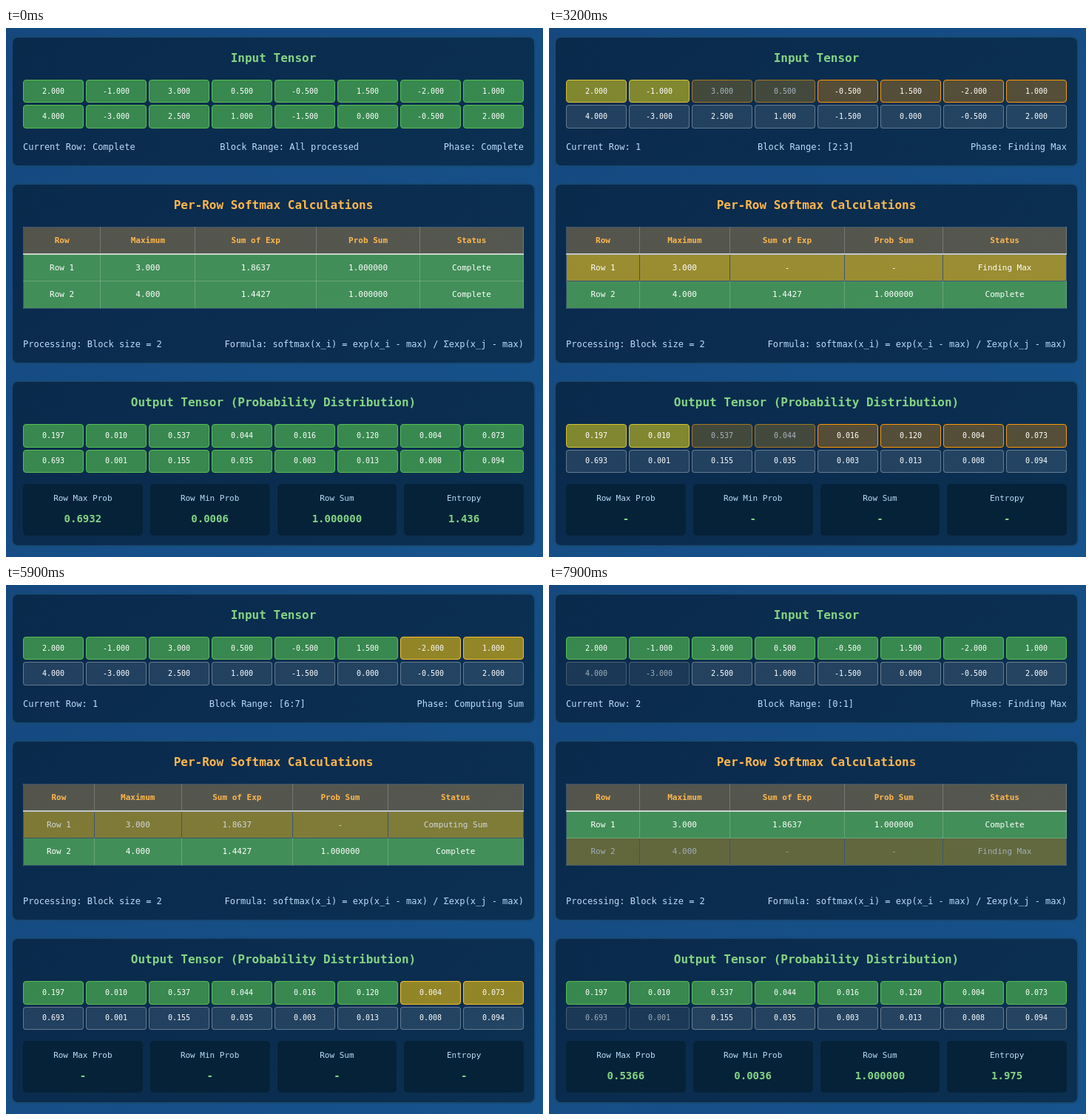
Animation, 726 px wide and 716 px high, one loop 8 s. Source, as an HTML page:

```html
<!DOCTYPE html>
<html lang="en">
<head>
<meta charset="utf-8">
<title>Softmax by blocks</title>
<style>
* { box-sizing: border-box; }
html, body { margin: 0; width: 100%; height: 100%; overflow: hidden; }
body {
  position: relative;
  background: linear-gradient(135deg, #15487f, #17538c);
  font: 12px/14px "DejaVu Sans Mono", monospace;
  color: #fff;
}
.panel {
  position: absolute; left: 7px; width: 709px;
  background: linear-gradient(135deg, #0a2a4c, #0b3052);
  border: 2px solid #174a74; border-radius: 9px;
}
.title, .info, .grid, .stats, table { position: absolute; left: 23px; width: 677px; }
.title { font-size: 16px; line-height: 20px; font-weight: bold; text-align: center; color: #84d484; }
.title.orange, th { color: #ffb74d; }
.info { display: flex; justify-content: space-between; color: #bbdefb; }
.grid { display: grid; grid-template-columns: repeat(8, 82px); grid-auto-rows: 31.4px; gap: 3px; }
.cell {
  display: flex; align-items: center; justify-content: center;
  border: 1px solid; border-radius: 4px; font-size: 10px;
}
table { top: 269px; height: 110px; border-collapse: collapse; font-size: 11px; line-height: 13px; text-align: center; }
th, td { padding: 0 12px; height: 36.5px; border: 1px solid rgba(255, 255, 255, .2); }
th { background: rgba(255, 183, 77, .3); border-bottom: 2px solid rgba(255, 255, 255, .7); }
td { background: rgba(255, 255, 255, .05); }
.stats { top: 617px; display: grid; grid-template-columns: repeat(4, 1fr); gap: 10px; }
.stat { height: 69.5px; padding-top: 13px; border-radius: 5px; background: #062238; text-align: center; font-size: 11px; color: #bbdefb; }
.stat b { display: block; margin-top: 12px; font-size: 14px; line-height: 17px; color: #84d484; }
</style>
</head>
<body>
<div class="panel" style="top:11px;height:177px"></div>
<div class="panel" style="top:210px;height:245px"></div>
<div class="panel" style="top:477px;height:225px"></div>

<div class="title" style="top:31px">Input Tensor</div>
<div class="grid" id="input" style="top:69.9px"></div>
<div class="info" style="top:154px"><span id="row"></span><span id="range"></span><span id="phase"></span></div>

<div class="title orange" style="top:230px">Per-Row Softmax Calculations</div>
<table>
  <thead><tr><th>Row</th><th>Maximum</th><th>Sum of Exp</th><th>Prob Sum</th><th>Status</th></tr></thead>
  <tbody id="rows"></tbody>
</table>
<div class="info" style="top:421px"><span>Processing: Block size = 2</span><span>Formula: softmax(x_i) = exp(x_i - max) / Σexp(x_j - max)</span></div>

<div class="title" style="top:497px">Output Tensor (Probability Distribution)</div>
<div class="grid" id="output" style="top:536.3px"></div>
<div class="stats" id="stats"></div>

<script>
const LOOP = 8000, START = 2750, STEP = 400, FADE = 300, PULSE = 1000;
const BLOCK = 2, BLOCKS = 4;
const PHASES = ['Finding Max', 'Computing Sum', 'Computing Softmax'];
const ROW_DONE = 3;
const INPUT = [
  [2, -1, 3, .5, -.5, 1.5, -2, 1],
  [4, -3, 2.5, 1, -1.5, 0, -.5, 2]
];
const STYLES = {
  idle: ['rgba(255,255,255,.1)', 'rgba(255,255,255,.3)'],
  active: ['rgba(255,152,0,.3)', '#ff9800'],
  current: ['rgba(255,205,10,.57)', '#ffc42a'],
  done: ['rgba(76,175,80,.7)', '#56c04f']
};

const $ = id => document.getElementById(id);
const sum = list => list.reduce((a, b) => a + b, 0);
const expSum = (list, max) => sum(list.map(x => Math.exp(x - max)));

const OUTPUT = INPUT.map(row => {
  const max = Math.max(...row), total = expSum(row, max);
  return row.map(x => Math.exp(x - max) / total);
});

// Everything starts complete, then row 1 runs through its phases and row 2 begins.
const steps = [{ at: 0, row: 2 }];
for (let i = 0; i < PHASES.length * BLOCKS; i++)
  steps.push({ at: START + i * STEP, row: 0, phase: Math.floor(i / BLOCKS), block: i % BLOCKS });
steps.push({ at: 7550, row: 0, phase: ROW_DONE, block: BLOCKS - 1 });
steps.push({ at: 7885, row: 1, phase: 0, block: 0 });

// The CSS "ease" curve.
function ease(x) {
  if (x <= 0 || x >= 1) return x <= 0 ? 0 : 1;
  const bezier = (t, a, b) => 3 * a * t * (1 - t) ** 2 + 3 * b * t * t * (1 - t) + t ** 3;
  let low = 0, high = 1;
  for (let i = 0; i < 20; i++) {
    const mid = (low + high) / 2;
    if (bezier(mid, .25, .25) < x) low = mid; else high = mid;
  }
  return bezier(low, .1, 1);
}

function pulse(age) {
  const x = age % PULSE / PULSE * 2;
  return x < 1 ? .6 + .4 * ease(x) : 1 - .4 * ease(x - 1);
}

function cellState(step, row, col, isInput) {
  if (row < step.row || (row === step.row && step.phase === ROW_DONE)) return 'done';
  if (row > step.row) return 'idle';
  const block = Math.floor(col / BLOCK);
  if (block === step.block) return 'current';
  if (block < step.block) return isInput && step.phase === 2 ? 'current' : 'done';
  return step.phase ? 'done' : 'active';
}

const rowRunning = (step, row) => row === step.row && step.phase < ROW_DONE;

function rowTexts(step, row) {
  const values = INPUT[row], name = 'Row ' + (row + 1);
  const max = Math.max(...values);
  if (!rowRunning(step, row))
    return [name, max.toFixed(3), expSum(values, max).toFixed(4), '1.000000', 'Complete'];
  const { phase, block } = step;
  const seen = values.slice(0, (block + 1) * BLOCK);
  return [
    name,
    (phase ? max : Math.max(...seen)).toFixed(3),
    phase ? expSum(phase === 1 ? seen : values, max).toFixed(4) : '-',
    '-',
    PHASES[phase]
  ];
}

function statTexts(step) {
  const last = step.phase === ROW_DONE ? step.row : step.row - 1;
  if (last < 0) return ['-', '-', '-', '-'];
  const probs = OUTPUT[last];
  return [
    Math.max(...probs).toFixed(4),
    Math.min(...probs).toFixed(4),
    sum(probs).toFixed(6),
    (-sum(probs.map(p => p * Math.log2(p)))).toFixed(3)
  ];
}

function add(parent, tag, className, text = '') {
  const node = document.createElement(tag);
  node.className = className;
  node.textContent = text;
  return parent.appendChild(node);
}

function setText(node, text) {
  if (node.textContent !== text) node.textContent = text;
}

const cells = [['input', INPUT], ['output', OUTPUT]].flatMap(([id, tensor]) =>
  tensor.flatMap((values, row) => values.map((value, col) =>
    ({ row, col, isInput: id === 'input', node: add($(id), 'div', 'cell', value.toFixed(3)) }))));
const tableRows = INPUT.map(() => {
  const node = add($('rows'), 'tr', '');
  return { node, columns: Array.from({ length: 5 }, () => add(node, 'td', '')) };
});
const statNodes = ['Row Max Prob', 'Row Min Prob', 'Row Sum', 'Entropy']
  .map(label => add(add($('stats'), 'div', 'stat', label), 'b', ''));

function drawCell({ row, col, isInput, node }, index, time) {
  const stateAt = i => cellState(steps[i], row, col, isInput);
  const state = stateAt(index), before = stateAt(Math.max(0, index - 1));
  const mix = ease((time - steps[index].at) / FADE) * 100;
  const blend = i => state === before ? STYLES[state][i]
    : `color-mix(in srgb, ${STYLES[state][i]} ${mix}%, ${STYLES[before][i]})`;
  node.style.backgroundColor = blend(0);
  node.style.borderColor = blend(1);
  let first = index;
  while (first > 0 && stateAt(first - 1) === state) first--;
  node.style.opacity = state === 'current' ? pulse(time - steps[first].at) : 1;
}

function draw(time) {
  const index = steps.findLastIndex(s => s.at <= time), step = steps[index];
  const complete = step.row === INPUT.length;
  const from = step.block * BLOCK;
  setText($('row'), 'Current Row: ' + (complete ? 'Complete' : step.row + 1));
  setText($('range'), 'Block Range: ' + (complete ? 'All processed' : `[${from}:${from + BLOCK - 1}]`));
  setText($('phase'), 'Phase: ' + (complete ? 'Complete' : PHASES[Math.min(step.phase, 2)]));
  cells.forEach(cell => drawCell(cell, index, time));
  tableRows.forEach(({ node, columns }, row) => {
    const running = rowRunning(step, row);
    const begin = steps.find(s => s.row === row).at;
    node.style.background = STYLES[running ? 'current' : 'done'][0];
    node.style.opacity = running ? pulse(time - begin) : 1;
    rowTexts(step, row).forEach((text, i) => setText(columns[i], text));
  });
  statTexts(step).forEach((text, i) => setText(statNodes[i], text));
}

const origin = performance.now();
function tick() {
  draw((performance.now() - origin) % LOOP);
  requestAnimationFrame(tick);
}
tick();
</script>
</body>
</html>
```
